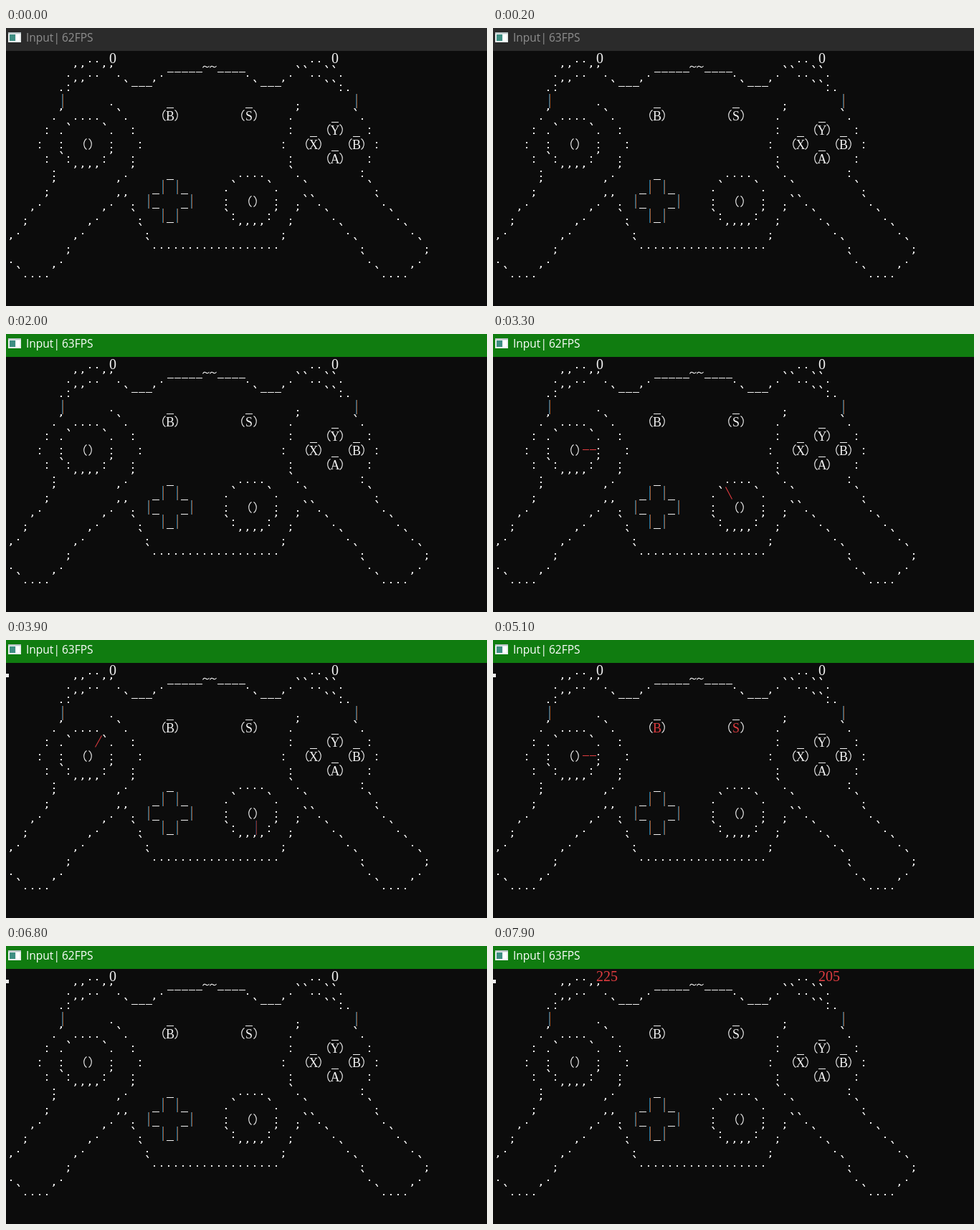
Recreate the animation shown at these times as an HTML page. Size 671 by 388 pixels, loop 8000 ms.

```html
<!DOCTYPE html>
<html lang="en">
<head>
<meta charset="utf-8">
<title>Input</title>
<style>
  html, body { margin: 0; width: 100%; height: 100%; overflow: hidden; background: #0c0c0c; }
  svg { display: block; width: 671px; height: 388px; }
  .title { font: 15.5px "Open Sans", "Noto Sans", sans-serif; }
  .key { font: 18px "Liberation Serif", serif; text-anchor: middle; }
  .num { font: 20px "Liberation Serif", serif; }
</style>
</head>
<body>
<svg id="stage" viewBox="0 0 671 388">
  <rect width="671" height="388" fill="#0c0c0c"/>
  <rect id="bar" width="671" height="32"/>
  <g shape-rendering="crispEdges">
    <rect x="3" y="6" width="18" height="14" fill="#e9eeee"/>
    <rect x="3" y="6" width="18" height="2" fill="#b9c4c6"/>
    <rect x="5" y="9" width="8" height="9" fill="#3f8f83"/>
    <rect x="14" y="9" width="5" height="9" fill="#ffffff"/>
  </g>
  <text id="title" class="title" y="19">
    <tspan x="28">Input</tspan><tspan x="66.5">|</tspan><tspan id="fps" x="78"></tspan>
  </text>
</svg>
<script>
const LOOP = 8000;
const WHITE = '#f2f2f2', RED = '#e03c40';
// A bar is one pixel of each fringe colour, side by side
const WHITE_FRINGE = ['#0c6796', '#a5592c'], RED_FRINGE = ['#14304e', '#8a2c24'];
const stage = document.getElementById('stage');
const byId = id => document.getElementById(id);
const cellX = col => col * 10 - 6;
const cellY = row => row * 20 + 32;

function add(tag, attrs, text = '', parent = stage) {
  const node = document.createElementNS('http://www.w3.org/2000/svg', tag);
  for (const name in attrs) node.setAttribute(name, attrs[name]);
  node.textContent = text;
  return parent.appendChild(node);
}

// Glyph outlines inside a 10 x 20 character cell
const FILLED = {
  '.': 'M2 14h2v2h-2z',
  ':': 'M2 7h2v2h-2zM2 14h2v2h-2z',
  "'": 'M2 0h2v2l-2 2h-1l1-2z',
  '`': 'M1 0h2l2 3v1h-1z',
  '-': 'M1 9h9v1h-9z',
  '_': 'M0 19h10v1h-10z'
};
const STROKED = {
  '(': 'M8.5 2.5C3.5 6 3.5 14 8.5 17.5',
  ')': 'M1.5 2.5C6.5 6 6.5 14 1.5 17.5',
  '~': 'M.5 3.5Q2.5 0 5 2T9.5 1',
  '/': 'M9.5 1.5L.5 17.5',
  '\\': 'M.5 1.5L9.5 18.5'
};

function glyph(ch, col, row, color) {
  const cell = add('g', { transform: `translate(${cellX(col)} ${cellY(row)})` });
  if (ch === '|') {
    const fringe = color === RED ? RED_FRINGE : WHITE_FRINGE;
    fringe.forEach((fill, i) => add('path', { d: `M${4 + i} 0h1v20h-1z`, fill }, '', cell));
  } else if (FILLED[ch]) {
    add('path', { d: FILLED[ch], fill: color }, '', cell);
  } else {
    add('path', { d: STROKED[ch], fill: 'none', stroke: color, 'stroke-width': 1.1 }, '', cell);
  }
  return cell;
}

// Each run is its first column followed by its characters
const pad = [
  '12.. 43..',
  "9.''..''. 22.-----~~----. 40.``..``.",
  "8.:'' 17`---' 35`---' 45``:.",
  '8| 15. 23_ 34_ 41. 49|',
  "7.' 10.... 16`. 22( 24) 33( 35) 40.' 46_ 49`.",
  '6: 8.` 14`. 18: 40: 43_ 45( 47) 49_ 51:',
  '5: 8: 11() 15: 19: 39: 42( 44) 46_ 48( 50) 52:',
  "6: 8`: 14:' 18: 40: 45( 47) 51:",
  "7: 10'''' 17.' 23_ 33.... 40`. 50:",
  "6.' 16' 21_| 24|_ 31.` 37`. 42` 51`.",
  "5.' 15.''. 20|_ 25_| 31: 34() 38: 41.``. 52`.",
  "3.' 13.' 18`. 22|_| 31`: 37:' 40.' 45`. 54`.",
  "2.' 11.' 19`. 33'''' 39.' 47`. 56`.",
  "1' 9.' 20`..................' 49`. 58`.",
  "1. 8.' 50`. 58.'",
  "2`....' 52`....'"
];
pad.forEach((line, row) => {
  for (const [, col, run] of line.matchAll(/(\d+)(\S+?)(?=\s|$)/g)) {
    [...run].forEach((ch, i) => glyph(ch, +col + i, row, WHITE));
  }
});

// Buttons with the [press, release] spans in ms
const buttons = [
  ['B', 23, 4, [[5100, 5200]]],
  ['S', 34, 4, [[4800, 5200]]],
  ['Y', 46, 5, [[6100, 6300]]],
  ['X', 43, 6, [[5800, 6000]]],
  ['B', 49, 6, [[6000, 6100], [6500, 6600]]],
  ['A', 46, 7, [[5500, 5800], [6600, 6800]]]
].map(([label, col, row, spans]) => ({
  spans,
  node: add('text', { class: 'key', x: cellX(col) + 5, y: cellY(row) + 17 }, label)
}));

// Stick directions: glyphs, column and row offset from the left parenthesis
const directions = {
  n: ['|', 1, -1], ne: ['/', 2, -1], e: ['--', 2, 0], se: ['\\', 2, 1],
  s: ['|', 1, 1], sw: ['/', -1, 1], w: ['--', -2, 0], nw: ['\\', -1, -1]
};

function makeStick(col, row, moves) {
  const marks = {};
  for (const dir in directions) {
    const [run, dx, dy] = directions[dir];
    marks[dir] = [...run].map((ch, i) => glyph(ch, col + dx + i, row + dy, RED));
  }
  return { marks, moves };
}
const sticks = [
  makeStick(11, 6, [
    [2800, 'nw'], [2900, 'n'], [3100, 'ne'], [3300, 'e'], [3500, 'se'], [3600, 's'],
    [3700, 'w'], [3800, 'nw'], [3900, 'ne'], [4000, 'e'], [4100, 'se'], [4200, 's'],
    [4300, 'sw'], [4400, ''], [4800, 'e'], [5500, '']
  ]),
  makeStick(34, 10, [
    [3000, 'sw'], [3300, 'nw'], [3500, 'n'], [3600, 'ne'], [3700, 'e'], [3800, 'se'],
    [3900, 's'], [4000, 'sw'], [4100, 'w'], [4300, 'nw'], [4400, '']
  ])
];

const triggers = [[15, 225], [46, 205]].map(([col, peak]) => ({
  peak,
  node: add('text', { class: 'num', x: cellX(col), y: cellY(0) + 17 })
}));

const cursor = add('rect', { y: 47, width: 4, height: 5, fill: WHITE });
const fpsChanges = [200, 1100, 2000, 2900, 3800, 4800, 5700, 6600, 7500];

const show = (node, on) => node.setAttribute('visibility', on ? 'visible' : 'hidden');
const paint = (node, color) => node.setAttribute('fill', color);

function render(t) {
  const focused = t >= 1000;
  paint(byId('bar'), focused ? '#107c10' : '#2b2b2b');
  paint(byId('title'), focused ? '#ffffff' : '#8f8f8f');
  byId('fps').textContent = 62 + fpsChanges.filter(at => at <= t).length % 2 + 'FPS';
  show(cursor, t >= 3500);

  for (const { node, spans } of buttons) {
    paint(node, spans.some(([from, to]) => t >= from && t < to) ? RED : WHITE);
  }
  for (const { marks, moves } of sticks) {
    const move = moves.filter(([at]) => at <= t).pop();
    for (const dir in marks) marks[dir].forEach(node => show(node, move && move[1] === dir));
  }
  const pull = Math.max(0, Math.floor((t - 7200) / 100)) / 7;
  for (const { node, peak } of triggers) {
    const value = Math.round(peak * pull);
    node.textContent = value;
    paint(node, value ? RED : WHITE);
  }
}

const start = performance.now();
function tick() {
  render((performance.now() - start) % LOOP);
  requestAnimationFrame(tick);
}
tick();
</script>
</body>
</html>
```
